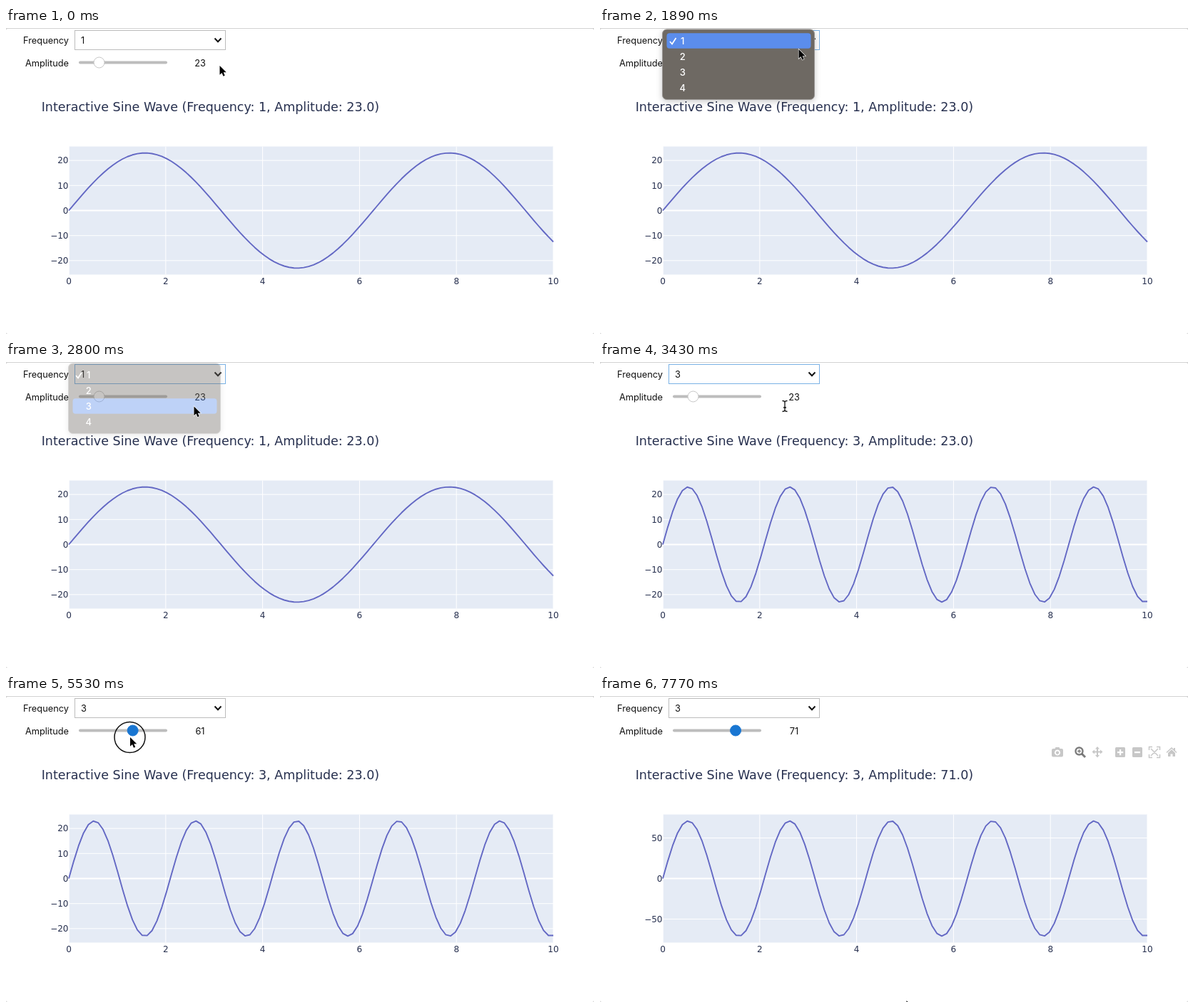
Write an HTML page that moves like this. It is 824x430 px and loops after 7.84 s.

```html
<!DOCTYPE html>
<html lang="en">
<head>
<meta charset="utf-8">
<title>Interactive sine wave</title>
<style>
  html, body { margin: 0; width: 100%; height: 100%; overflow: hidden; background: #fff; }
  svg { display: block; width: 100vw; height: 100vh; }
  .ui { font: 12.8px Inter, Roboto, sans-serif; fill: #111; }
  .plot { font: 12px "DejaVu Sans", sans-serif; fill: #27304f; }
  .title { font-size: 17.5px; }
  .end { text-anchor: end; }
  .mid { text-anchor: middle; }
  #menu { filter: drop-shadow(0 2px 4px rgba(0, 0, 0, .22)); }
  #menu text { fill: #fff; font-size: 13px; font-weight: 500; }
</style>
</head>
<body>
<svg viewBox="0 0 824 430">
  <rect width="824" height="430" fill="#d2d2d2"/>
  <rect y="1" width="824" height="429" rx="3" fill="#fff"/>

  <g class="plot">
    <text id="title" class="title" x="49.7" y="116.5"></text>
    <rect x="88.5" y="166.5" width="678.5" height="180" fill="#e5ebf5"/>
    <g id="xAxis"></g>
    <g id="yAxis"></g>
    <path d="M88 256.5H767" stroke="#fff" stroke-width="2"/>
    <path id="wave" fill="none" stroke="#6368c4" stroke-width="1.9" stroke-linejoin="round"/>
  </g>

  <g id="modebar" fill="#444" fill-opacity=".3" stroke-opacity=".3">
    <path fill-rule="evenodd" d="M635 74h2.5l1-2h5l1 2h2.500q2 0 2 2v7.500q0 2-2 2h-12q-2 0-2-2v-7.500q0-2 2-2zM641 75.500a4 4 0 1 0 .01 0zM641 77.500a2.200 2.200 0 1 1-.01 0z"/>
    <g fill="none" stroke="#444" stroke-opacity=".7">
      <circle cx="671.5" cy="77.5" r="5" stroke-width="2.4"/>
      <path d="M675.5 81.5l4.500 4.500" stroke-width="3"/>
      <path d="M669 77.500h5M671.500 75v5" stroke-width="1.300"/>
    </g>
    <path d="M697 71l3 3.500h-2v3h3v-2l3.500 3-3.500 3v-2h-3v3.500h2l-3 3.500-3-3.500h2v-3.500h-3v2l-3.500-3 3.500-3v2h3v-3h-2z"/>
    <path fill-rule="evenodd" d="M723.500 72h11q1.500 0 1.500 1.500v11q0 1.500-1.500 1.500h-11q-1.500 0-1.500-1.500v-11q0-1.500 1.500-1.500zM728 75v3h-3v2.200h3v3h2.200v-3h3v-2.200h-3v-3z"/>
    <path fill-rule="evenodd" d="M747.500 72h11q1.500 0 1.500 1.500v11q0 1.500-1.500 1.500h-11q-1.500 0-1.500-1.500v-11q0-1.500 1.500-1.500zM749 78v2.200h8v-2.200z"/>
    <path fill="none" stroke="#444" stroke-width="1.500" d="M769.500 76v-4.500h4.500M780 71.500h4.500v4.500M784.500 82v4.500h-4.500M774 86.500h-4.500v-4.500M772 74l10 10M782 74l-10 10"/>
    <path d="M801 72l3 2.800v-1.800h2v3.700l2.500 2.300-1 1-6.500-6-6.500 6-1-1zM796 80l5-4.700 5 4.700v5h-3.500v-3.500h-3v3.500h-3.500z"/>
  </g>

  <g class="ui">
    <text class="end" x="88" y="21.500">Frequency</text>
    <text class="end" x="88" y="53.500">Amplitude</text>
    <rect id="box" x="96.5" y="3.5" width="211" height="27" fill="#fff"/>
    <text id="freq" x="105" y="21.500"></text>
    <path d="M292.500 14.500l4.500 4.700 4.500-4.700" fill="none" stroke="#111" stroke-width="2"/>
    <rect x="102" y="46.500" width="124" height="4" rx="2" fill="#bdbdbd"/>
    <circle id="knob" cy="48.5" r="7.500"/>
    <text id="amp" class="mid" x="272" y="53.500"></text>
  </g>

  <g id="menu" class="ui">
    <rect x="87.500" y="2" width="213" height="98.500" rx="6" fill="#6e6963" stroke="#9a9794"/>
    <rect id="hover" x="93.500" width="202" height="21.500" rx="4" fill="#5b8dec"/>
    <path d="M98 19l3 3.500 5.500-8.500" fill="none" stroke="#fff" stroke-width="1.700"/>
    <g id="items"></g>
  </g>

  <circle id="ring" r="21.500" fill="none" stroke="#111" stroke-width="1.500"/>
  <path id="arrow" d="M.5 0v12.800l3-2.800 2 4.800 2.200-1-2-4.600h4z" fill="#000" stroke="#fff" stroke-width="1.200" paint-order="stroke"/>
  <g id="beam" fill="none">
    <path id="stem" d="M-3.500-7.500q3.500 0 3.500 2v11q0 2-3.500 2M3.500-7.500q-3.500 0-3.500 2M0 5.500q0 2 3.500 2M-2 2h4" stroke="#111" stroke-width="1.300"/>
  </g>
</svg>

<script>
const LOOP = 7840, STEP = 70;
const $ = id => document.getElementById(id);
const set = (id, attrs) => {
  for (const k in attrs) $(id).setAttribute(k, attrs[k]);
};
const show = (id, on) => set(id, { visibility: on ? "visible" : "hidden" });
const within = (t, a, b) => t >= a && t < b;

// keys: [time, value, ...]; returns the interpolated values
function track(keys, t) {
  const i = keys.findIndex(k => k[0] > t);
  if (i === 0) return keys[0].slice(1);
  if (i < 0) return keys[keys.length - 1].slice(1);
  const a = keys[i - 1], b = keys[i], p = (t - a[0]) / (b[0] - a[0]);
  return a.slice(1).map((v, j) => v + (b[j + 1] - v) * p);
}

const pointer = [
  [0, 299, 53], [490, 293, 22.3], [1190, 293, 22.3], [1330, 284, 21.6],
  [1750, 284, 21.6], [1890, 278, 30], [2240, 263, 62.5], [3360, 263, 62.5],
  [3430, 259, 62], [4130, 125, 49], [4620, 125, 49], [5530, 173.5, 58],
  [5880, 185.5, 60], [7070, 185.5, 60], [7210, 185, 60], [7420, 185, 60],
  [7490, 196, 75], [7770, 429, 428]
];
const slider = [[4620, 23], [5530, 61], [5880, 71]];
const fade = [[2660, 1], [2800, .39], [2940, 0]];
const clicks = [[560, 700], [1470, 1680], [2450, 2590], [4270, 6090]];

const X0 = 88, W = 679, MID = 256.5, PEAK = 80.9;

function drawAxes(amp) {
  const step = amp > 50 ? 50 : 10;
  let out = "";
  for (let v = -Math.floor(amp / step) * step; v <= amp; v += step) {
    const y = MID - v * PEAK / amp;
    out += `<path d="M88 ${y}H767" stroke="#fff"/>` +
      `<text class="end" x="87.500" y="${y + 4.2}">${String(v).replace("-", "\u2212")}</text>`;
  }
  $("yAxis").innerHTML = out;
}

function drawChart(freq, amp) {
  $("title").textContent =
    `Interactive Sine Wave (Frequency: ${freq}, Amplitude: ${amp.toFixed(1)})`;
  drawAxes(amp);
  const pts = Array.from({ length: 100 }, (_, i) => {
    const u = i / 99;
    return `${(X0 + u * W).toFixed(2)} ${(MID - PEAK * Math.sin(freq * u * 10)).toFixed(2)}`;
  });
  set("wave", { d: "M" + pts.join("L") });
}

function setup() {
  let axis = "", items = "";
  for (let i = 0; i <= 5; i++) {
    const x = X0 + i * W / 5;
    axis += `<path d="M${x} 166.500V346.500" stroke="#fff"/>` +
      `<text class="mid" x="${x}" y="359.700">${i * 2}</text>`;
  }
  for (let i = 0; i < 4; i++) {
    items += `<text class="mid" x="115.800" y="${22.7 + i * 22}">${i + 1}</text>`;
  }
  $("xAxis").innerHTML = axis;
  $("items").innerHTML = items;
}

let chartKey = "";

function render(time) {
  const t = Math.floor(time / STEP) * STEP;
  const [x, y] = track(pointer, t);
  const place = { transform: `translate(${x} ${y})` };

  const freq = t < 2940 ? 1 : 3, chartAmp = t < 6160 ? 23 : 71;
  const key = freq + "/" + chartAmp;
  if (key !== chartKey) drawChart(freq, chartAmp);
  chartKey = key;

  const amp = Math.round(track(slider, t)[0]);
  const held = t >= 4270;
  $("freq").textContent = freq;
  $("amp").textContent = amp;
  set("box", { stroke: within(t, 1470, 4270) ? "#7ab2e6" : "#bcbcbc" });
  set("knob", {
    cx: 102 + 1.24 * amp,
    fill: held ? "#1976d2" : "#fff",
    stroke: held ? "#1976d2" : "#c6c6c6"
  });

  show("menu", within(t, 1540, 2940));
  set("menu", { opacity: track(fade, t)[0] });
  const row = Math.max(0, Math.min(3, Math.floor((y - 10) / 22)));
  set("hover", { y: 7.3 + row * 22, opacity: t === 2590 ? 0 : 1 });

  set("modebar", { opacity: track([[7490, 0], [7700, 1]], t)[0] });

  const text = within(t, 3430, 3570);
  show("arrow", !text);
  show("beam", text);
  show("ring", clicks.some(c => within(t, ...c)));
  ["arrow", "beam", "ring"].forEach(id => set(id, place));
}

setup();
const start = performance.now();
function tick() {
  render((performance.now() - start) % LOOP);
  requestAnimationFrame(tick);
}
tick();
</script>
</body>
</html>
```
